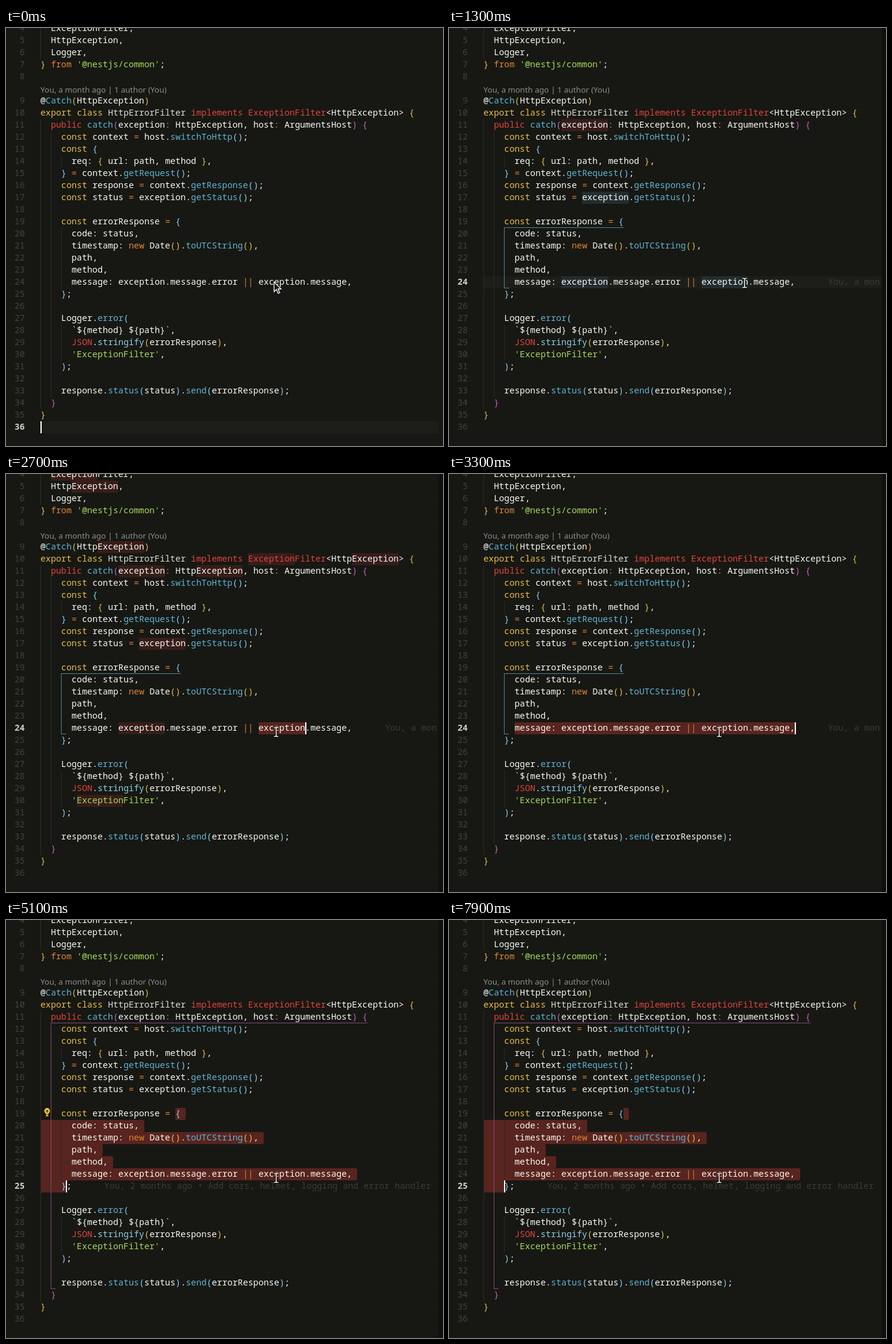
These frames come from a looping animation (723x692 px, 8000 ms). An HTML page with a canvas:

```html
<!DOCTYPE html>
<html lang="en">
<head>
<meta charset="utf-8">
<style>
  html, body { margin: 0; width: 723px; height: 692px; overflow: hidden; background: #171813; }
  canvas { display: block; }
</style>
</head>
<body>
<canvas id="stage" width="723" height="692"></canvas>
<script>
const ctx = document.getElementById('stage').getContext('2d');
const LOOP = 8000, LEFT = 57, CHAR = 8.59, FIRST = 4;
const WHITE = '#f8f8f2', GOLD = '#e6bd48', RED = '#e0433c', ORANGE = '#de8438',
      BLUE = '#5fb3d3', GREEN = '#a5d85c', SELECTION = '#58241f';
const BRACKETS = [GOLD, '#c660bd', '#87cefa'];
const CODE = `  ExceptionFilter,
  HttpException,
  Logger,
} from '@nestjs/common';

@Catch(HttpException)
export class HttpErrorFilter implements ExceptionFilter<HttpException> {
  public catch(exception: HttpException, host: ArgumentsHost) {
    const context = host.switchToHttp();
    const {
      req: { url: path, method },
    } = context.getRequest();
    const response = context.getResponse();
    const status = exception.getStatus();

    const errorResponse = {
      code: status,
      timestamp: new Date().toUTCString(),
      path,
      method,
      message: exception.message.error || exception.message,
    };

    Logger.error(
      \`\${method} \${path}\`,
      JSON.stringify(errorResponse),
      'ExceptionFilter',
    );

    response.status(status).send(errorResponse);
  }
}
`.split('\n');
const KEYWORDS = {
  export: GOLD, class: GOLD, const: GOLD, public: RED, implements: RED, JSON: RED,
  from: ORANGE, new: ORANGE, Date: WHITE, HttpErrorFilter: '#dcdcd2', stringify: '#8ccfe6'
};
const TOKEN = /`|'[^']*'|ExceptionFilter(?=<)|\w+|[()[\]{}]|(?<=exception|host):|=|\|\||[^\s\w]/g;

const lineY = n => n < 9 ? (n - 4) * 20 : 120 + (n - 9) * 20;
const rowTop = n => lineY(n) - 9;
const colX = c => LEFT + c * CHAR;
const text = n => CODE[n - FIRST];

function rect(color, x, y, w, h) {
  ctx.fillStyle = color;
  ctx.fillRect(x, y, w, h);
}

function write(s, x, y, color, weight = '') {
  ctx.font = `${weight} 14.317px "Noto Sans Mono", "DejaVu Sans Mono", monospace`;
  ctx.fillStyle = color;
  ctx.fillText(s, x, y);
}

function mark(n, from, to, color) {
  ctx.fillStyle = color;
  ctx.beginPath();
  ctx.roundRect(colX(from), rowTop(n), (to - from) * CHAR, 20, [0, 3, 3, 0]);
  ctx.fill();
}

function drawCode(swap, link) {
  let depth = 1;
  CODE.forEach((source, i) => {
    const n = i + FIRST, inTemplate = source.includes('`');
    let line = source;
    if (n === 19) line = line.replace('{', swap[0]);
    if (n === 25) line = line.replace('}', swap[1]);
    for (const { 0: token, index } of line.matchAll(TOKEN)) {
      let color = KEYWORDS[token] || WHITE;
      if (/^[`']/.test(token)) color = GREEN;
      else if (/^(=|:|\|\|)$/.test(token)) color = token === ':' && n !== 11 ? WHITE : ORANGE;
      else if (token === 'ExceptionFilter' && n === 10) color = RED;
      else if (!inTemplate && /[([{]/.test(token)) color = BRACKETS[depth++ % 3];
      else if (!inTemplate && /[)\]}]/.test(token)) color = BRACKETS[--depth % 3];
      else if (color === WHITE && line[index + token.length] === '(' && token !== 'Date') color = BLUE;
      if (link && n === 24 && index === 42) color = GOLD;
      write(token, colX(index), lineY(n) + 5, color);
    }
  });
  if (link) rect(GOLD, colX(42), 426, 9 * CHAR, 2);
}

function indentGuides() {
  for (const [x, top, bottom] of [[57, 0, 51], [57, 151, 631], [74, 171, 611],
    [91, 211, 231], [91, 331, 431], [91, 491, 551]]) rect('#2b2c27', x, top, 1, bottom - top);
}

function bracketGuide(color, x, top, right, bottom) {
  rect(color, x, top, right - x, 1);
  rect(color, x, top, 1, bottom - top);
  rect(color, x, bottom, 8, 1);
}

function bulb(y) {
  ctx.fillStyle = '#f0c23c';
  ctx.beginPath();
  ctx.arc(68, y - 3, 4.7, 0, 7);
  ctx.fill();
  rect('#f0c23c', 66, y, 4, 6);
  rect('#3a2c14', 66, y - 4, 4, 2);
  rect('#3a2c14', 67.5, y - 3, 1, 4);
  rect('#3a2c14', 66, y + 3, 4, 1);
}

const SHAPES = {
  arrow: 'M0 0V16L4 12.4L6.8 19L9.4 17.8L6.6 11.5H11.5Z',
  hand: 'M4 1Q6 0 6.7 2V6L13 7.3Q15.5 8 15 10.5L14 15H6.5L1 10Q0 8 2 8L4.3 9.5V2Z'
};

function pointer(kind, x, y) {
  ctx.save();
  ctx.translate(x, y);
  if (kind === 'beam') {
    const beam = new Path2D('M-3.5 -7.5H-1L0 -6.5L1 -7.5H3.5M0 -6.5V6.5M-3.5 7.5H-1L0 6.5L1 7.5H3.5');
    for (const [color, width] of [['#000', 3.4], ['#fff', 1.5]]) {
      ctx.strokeStyle = color;
      ctx.lineWidth = width;
      ctx.stroke(beam);
    }
  } else {
    const shape = new Path2D(SHAPES[kind]);
    ctx.fillStyle = '#151515';
    ctx.strokeStyle = '#fff';
    ctx.lineWidth = 1.3;
    ctx.fill(shape);
    ctx.stroke(shape);
  }
  ctx.restore();
}

function drawPointer(t) {
  if (t < 100) return pointer('arrow', 443.5, 420.5);
  if (t >= 2200 && t < 2500) return pointer('hand', 442.5, 426);
  if (t < 400) return pointer('beam', 454, 422);
  const out = Math.min(1, Math.max(0, (t - 1000) / 300));
  const back = Math.min(1, Math.max(0, (t - 1500) / 200));
  pointer('beam', 443 + 46 * out - 42 * back, 425 - 3 * out + 5 * back);
}

function selectionAt(t) {
  if (t < 2600) return null;
  if (t < 3300) return [24, 42, 24, 51];
  if (t < 3700) return [24, 6, 24, 60];
  if (t < 4200) return [24, 0, 24, 60];
  return t < 5000 || t >= 7900 ? [19, 27, 25, 4] : [19, 26, 25, 5];
}

function render(now) {
  const t = Math.floor(now % LOOP / 100) * 100;
  const between = (a, b) => t >= a && t < b;
  const activeLine = t < 400 ? 36 : t < 4200 ? 24 : 25;
  const selection = selectionAt(t);

  rect('#171813', 0, 0, 723, 692);
  if (!selection) rect('#1d1e1a', LEFT, rowTop(activeLine), 659, 20);

  if (between(600, 2600)) {
    mark(11, 15, 24, '#381d19');
    for (const [n, col] of [[17, 19], [24, 15], [24, 42]]) mark(n, col, col + 9, '#232d30');
  }
  if (between(2600, 3300)) CODE.forEach((line, i) => {
    for (const { index } of line.matchAll(/exception/gi)) mark(i + FIRST, index, index + 9, '#381d19');
  });
  if (selection) {
    const [n0, c0, n1, c1] = selection;
    for (let n = n0; n <= n1; n++)
      mark(n, n === n0 ? c0 : 0, n === n1 ? c1 : text(n).length + 1, SELECTION);
  }

  indentGuides();
  if (between(500, 5100)) bracketGuide('#587f90', 91, 330, 289, 430);
  if (t >= 5100) bracketGuide('#80497a', 74, 170, 598, 610);

  CODE.forEach((_, i) => {
    const n = i + FIRST, active = n === activeLine;
    write(n, 31.2 - CHAR * String(n).length, lineY(n) + 5, active ? '#d0d0ca' : '#41423e', active ? 'bold' : '');
  });
  ctx.font = '13.1px "Noto Sans", sans-serif';
  ctx.fillStyle = '#8d8e89';
  ctx.fillText('You, a month ago | 1 author (You)', LEFT, 107);

  const swap = between(6800, 7600) ? '()' : between(7600, 7900) ? '[]' : '{}';
  drawCode(swap, between(2200, 2500));

  if (between(800, 2600) || between(2700, 4300)) write('You, a mon', 627, 425, '#3a3b37');
  if (t >= 4500) write('You, 2 months ago • Add cors, helmet, logging and error handler', 162.6, 445, '#3a3b37');
  if (t >= 800) {
    const shade = ctx.createLinearGradient(713, 0, 719, 0);
    shade.addColorStop(0, '#0000');
    shade.addColorStop(1, '#0006');
    rect(shade, 713, 0, 10, 692);
  }

  if (between(3500, 4400)) bulb(419);
  if (between(4400, 7000)) bulb(319);

  const caretOff = [[100, 400], [1200, 1700], [2200, 2600], [4700, 5000], [5500, 6000], [6500, 6800], [7200, 7600]];
  if (!caretOff.some(([a, b]) => between(a, b))) {
    const col = selection ? selection[3] : t < 400 ? 0 : 45;
    rect('#fff', Math.floor(colX(col)), rowTop(activeLine), 2, 20);
  }
  drawPointer(t);
}

(function frame() {
  render(performance.now());
  requestAnimationFrame(frame);
})();
</script>
</body>
</html>
```
